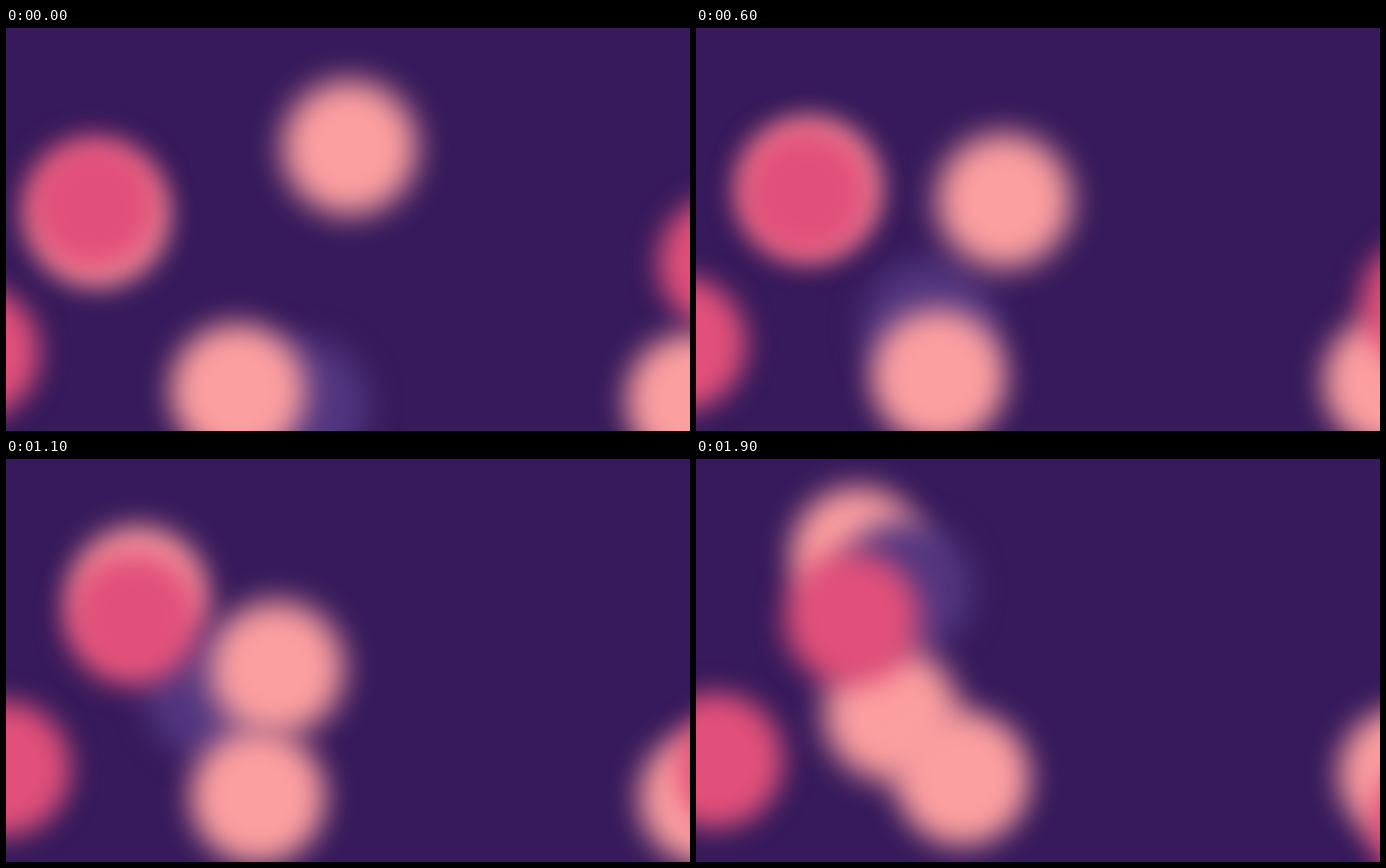
An HTML page for the animation above (2000 ms loop, 800 by 472 pixels).

```html
<!DOCTYPE html>
<html lang="en">
<head>
<meta charset="utf-8">
<title>Drifting lights</title>
<style>
  html, body { margin: 0; width: 100%; height: 100%; overflow: hidden; background: #361a5b; }
  #stage { position: absolute; left: 0; top: 0; width: 800px; height: 472px; overflow: hidden; }
  .ball { position: absolute; left: -79px; top: -79px; width: 158px; height: 158px; border-radius: 50%; }
</style>
</head>
<body>
<div id="stage"></div>
<script>
const LOOP = 2000, STEP = 100;
const SALMON = '#fc9fa0', PINK = '#e1507a', VIOLET = '#52367f';

// Back to front. x and y hold start, velocity and curvature, in px and seconds.
const balls = [
  { color: SALMON, blur: 17, x: [108, 43, 0],     y: [222, -58, 0] },
  { color: VIOLET, blur: 18, x: [345, -150, 51],  y: [442, -153, 0] },
  { color: SALMON, blur: 18, x: [402, -59, -17],  y: [140, 113, -15.7] },
  { color: SALMON, blur: 17, x: [271, 21.5, 0],   y: [425, -27, 0] },
  { color: SALMON, blur: 17, x: [804, 14, 0],     y: [436, -37, 1] },
  { color: PINK,   blur: 17, x: [103, 42, 0],     y: [208, -32, 11] },
  { color: PINK,   blur: 16, x: [-40, 33, 0],     y: [380, -18, 2] },
  { color: PINK,   blur: 16, x: [842, 28, -8],    y: [275, 80, 0] }
];

const stage = document.getElementById('stage');
for (const ball of balls) {
  ball.element = document.createElement('div');
  ball.element.className = 'ball';
  ball.element.style.background = ball.color;
  ball.element.style.filter = `blur(${ball.blur}px)`;
  stage.append(ball.element);
}

const along = ([start, velocity, curve], t) => start + velocity * t + curve * t * t;

function draw() {
  const t = Math.floor(performance.now() % LOOP / STEP) * STEP / 1000;
  for (const { element, x, y } of balls) {
    element.style.transform = `translate(${along(x, t)}px, ${along(y, t)}px)`;
  }
  requestAnimationFrame(draw);
}
draw();
</script>
</body>
</html>
```
